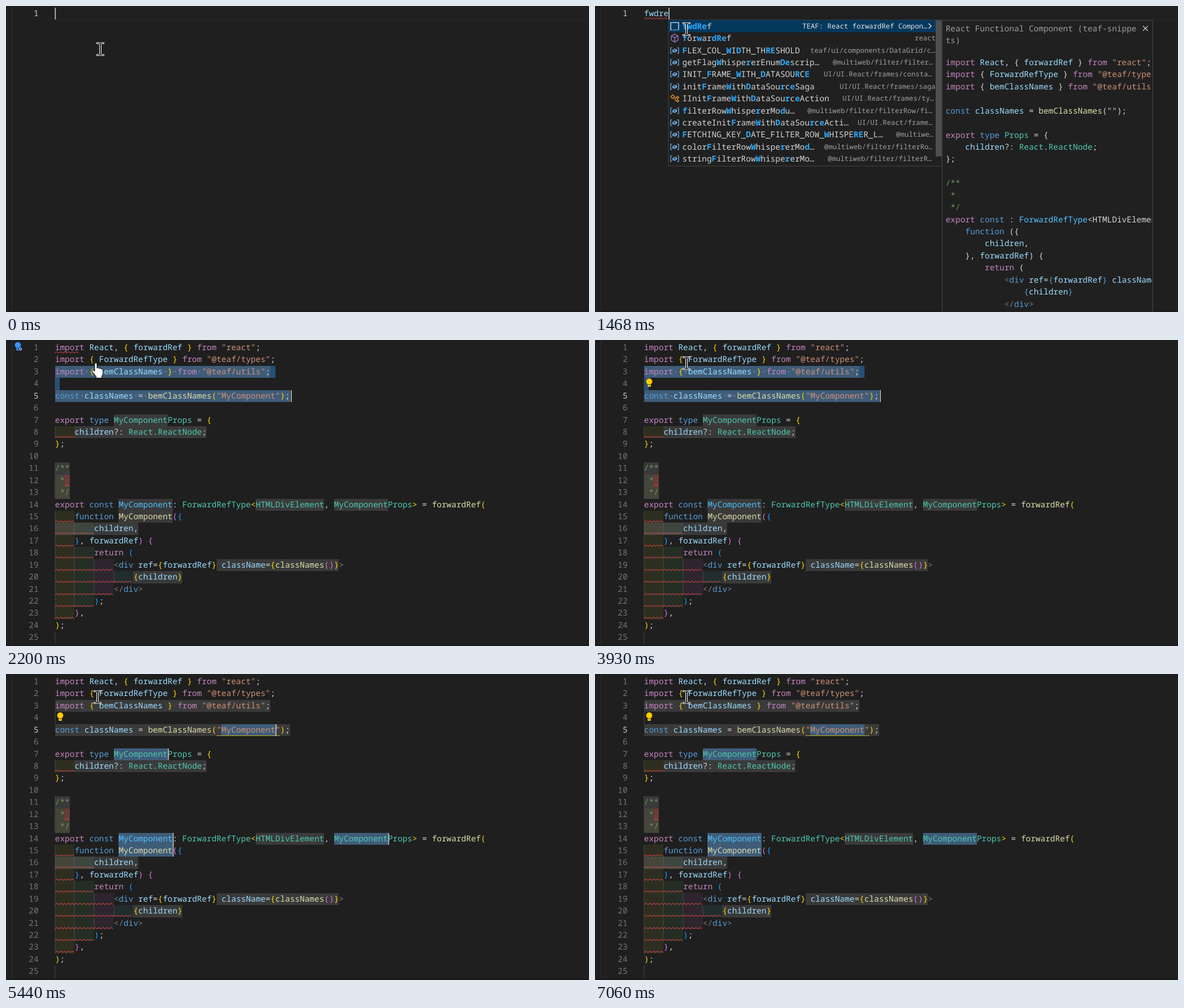
These frames come from a looping animation (1032 by 543 pixels, 8 s). An HTML page:

```html
<!DOCTYPE html>
<html lang="en">
<head>
<meta charset="utf-8">
<title>Snippet completion in a code editor</title>
<style>
html, body { margin: 0; width: 100%; height: 100%; overflow: hidden; background: #1f1f1f; }
svg { display: block; width: 1032px; height: 543px; }
text {
  font: 500 14.44px "Noto Sans Mono", "DejaVu Sans Mono", monospace;
  text-rendering: geometricPrecision;
  white-space: pre;
  fill: #d4d4d4;
}
.small { font-size: 12.3px; fill: #a0a0a0; }
.small.on { fill: #e4e4e4; }
.num { text-anchor: end; fill: #6e7681; }
.num.on { fill: #cccccc; }
.k { fill: #c586c0 } .b { fill: #569cd6 } .v { fill: #9cdcfe } .c { fill: #4fc1ff }
.s { fill: #ce9178 } .y { fill: #4ec9b0 } .f { fill: #dcdcaa } .m { fill: #6a9955 }
.g { fill: #ffd700 } .p { fill: #da70d6 } .u { fill: #179fff } .x { fill: #808080 }
.t { fill: #d4d4d4 } .d { fill: #9d9d9d } .h { fill: #2aaaff; font-weight: 700 }
.dot { fill: #8fa3b5; }
.wave { fill: none; stroke: #f14c4c; stroke-width: 1; }

/* each layer is switched hard on the shared 8 s clock */
.layer { animation: 8s step-end infinite; }
.empty { animation-name: empty }
.popup { animation-name: popup }
.code { animation-name: code }
.pick { animation-name: pick }
.select { animation-name: select }
.bulb { animation-name: bulb }
.multi { animation-name: multi }
.blink { animation-name: blink }
.beam { animation-name: beam }
.before { animation-name: before }
@keyframes empty { 0% { opacity: 1 } 4.625%, 100% { opacity: 0 } }
@keyframes before { 0% { opacity: 1 } 27.5%, 100% { opacity: 0 } }
@keyframes popup { 0% { opacity: 0 } 4.625% { opacity: 1 } 27.5%, 100% { opacity: 0 } }
@keyframes code { 0% { opacity: 0 } 27.5%, 100% { opacity: 1 } }
@keyframes pick { 0% { opacity: 0 } 27.5% { opacity: 1 } 49.125%, 100% { opacity: 0 } }
@keyframes select { 0% { opacity: 0 } 27.5% { opacity: 1 } 68%, 100% { opacity: 0 } }
@keyframes bulb { 0% { opacity: 0 } 49.125%, 100% { opacity: 1 } }
@keyframes multi { 0% { opacity: 0 } 68%, 100% { opacity: 1 } }
@keyframes blink { 0% { opacity: 0 } 68% { opacity: 1 } 88.25%, 100% { opacity: 0 } }
@keyframes beam { 0% { opacity: 0 } 4.625% { opacity: 1 } 27.5% { opacity: 0 } 49.125%, 100% { opacity: 1 } }
</style>
</head>
<body>
<svg id="stage" viewBox="0 0 1032 543" xmlns="http://www.w3.org/2000/svg"></svg>
<script>
const CHAR = 8.665, LINE = 21.43, LEFT = 86.8, TOP = 3, BASE = 15;
const colX = c => LEFT + c * CHAR;
const rowY = n => Math.round(TOP + (n - 1) * LINE);

// A bar and a letter switch the colour class: "|kimport |vReact"
const CODE = [
  '|kimport |vReact|t, |g{ |vforwardRef |g} |kfrom |s"react"|t;',
  '|kimport |g{ |vForwardRefType |g} |kfrom |s"@teaf/types"|t;',
  '|kimport |g{ |vbemClassNames |g} |kfrom |s"@teaf/utils"|t;',
  '',
  '|bconst |vclassNames |t= |fbemClassNames|g(|s"MyComponent"|g)|t;',
  '',
  '|kexport |btype |yMyComponentProps |t= |g{',
  '    |vchildren|t?: |yReact|t.|yReactNode|t;',
  '|g}|t;',
  '',
  '|m/**',
  ' |m* ',
  ' |m*/',
  '|kexport |bconst |cMyComponent|t: |yForwardRefType|g<|yHTMLDivElement|t, |yMyComponentProps|g> |t= |fforwardRef|g(',
  '    |bfunction |fMyComponent|p(|u{',
  '        |vchildren|t,',
  '    |u}|t, |vforwardRef|p) {',
  '        |kreturn |u(',
  '            |x<|bdiv |vref|t=|g{|vforwardRef|g} |vclassName|t=|g{|fclassNames|p()|g}|x>',
  '                |g{|vchildren|g}',
  '            |x</|bdiv|x>',
  '        |u)|t;',
  '    |p}|t,',
  '|g)|t;',
  ''
];

const DOC = [
  '|kimport |vReact|t, { |vforwardRef |t} |kfrom |s"react"|t;',
  '|kimport |t{ |vForwardRefType |t} |kfrom |s"@teaf/types"|t;',
  '|kimport |t{ |vbemClassNames |t} |kfrom |s"@teaf/utils"|t;',
  '',
  '|bconst |vclassNames |t= |fbemClassNames|t("");',
  '',
  '|kexport |btype |yProps |t= {',
  '    |vchildren|t?: |yReact|t.|yReactNode|t;',
  '};',
  '',
  '|m/**',
  ' |m*',
  ' |m*/',
  '|kexport |bconst |t: |cForwardRefType|t<HTMLDivElement',
  '    |bfunction |t({',
  '        |vchildren|t,',
  '    }, |vforwardRef|t) {',
  '        |kreturn |t(',
  '            |x<|bdiv |vref|t=|b{|vforwardRef|b} |vclassName',
  '                |b{|vchildren|b}',
  '            |x</|bdiv|x>'
];

// label with matched letters, detail, detail x
const ITEMS = [
  ['|hfwdRe|tf', 'TEAF: React forwardRef Compon…', 367],
  ['|hf|tor|hw|tar|hdRe|tf', 'react', 566],
  ['|hF|tLEX_COL_|hW|tI|hD|tTH_TH|hRE|tSHOLD', 'teaf/ui/components/DataGrid/c…', 381],
  ['getFlag|hW|thispe|hr|terEnum|hDe|tscrip…', '@multiweb/filter/filter…', 421],
  ['INIT_|hF|tRAME_|hW|tITH_|hD|tATASOU|hR|tC|hE', 'UI/UI.React/frames/consta…', 405],
  ['init|hF|trame|hW|tith|hD|tataSou|hr|tc|he|tSaga', 'UI/UI.React/frames/saga', 433],
  ['IInit|hF|trame|hW|tith|hD|tataSou|hr|tc|he|tAction', 'UI/UI.React/frames/ty…', 438],
  ['|hf|tilterRow|hW|thispe|hr|terMo|hd|tu…', '@multiweb/filter/filterRow/fi…', 376],
  ['createInit|hF|trame|hW|tith|hD|tataSou|hr|tc|he|tActi…', 'UI/UI.React/frame…', 465],
  ['|hF|tETCHING_KEY_|hD|tATE_FILTER_ROW_|hW|tHISPE|hRE|tR_L…', '@multiwe…', 533],
  ['color|hF|tilterRow|hW|thispe|hr|terMo|hd|t…', '@multiweb/filter/filterRo…', 406],
  ['string|hF|tilterRow|hW|thispe|hr|terMo…', '@multiweb/filter/filterR…', 412]
];

const esc = s => s.replace(/&/g, '&amp;').replace(/</g, '&lt;');
const box = (x, y, w, h, fill, extra = '') =>
  `<rect x="${x}" y="${y}" width="${w}" height="${h}" fill="${fill}" ${extra}/>`;
const span = (n, from, to, fill) => {
  const x = Math.round(colX(from));
  return box(x, rowY(n), Math.round(colX(to)) - x, rowY(n + 1) - rowY(n), fill);
};
const spans = (list, fill) => list.map(([n, a, b]) => span(n, a, b, fill)).join('');
const layer = (name, body) => `<g class="layer ${name}">${body}</g>`;
const plain = (x, y, s, cls = '') => `<text x="${x}" y="${y}" class="${cls}">${esc(s)}</text>`;
const caret = (n, c) => box(colX(c) - 0.3, rowY(n), 1.6, 21, '#c8c8c8');
const number = (n, on) => plain(57.6, rowY(n) + BASE, String(n), 'num' + (on ? ' on' : ''));

function rich(x, y, s) {
  const indent = s.match(/^ */)[0].length;
  const parts = s.slice(indent).split('|').map((p, i) =>
    i ? `<tspan class="${p[0]}">${esc(p.slice(1))}</tspan>` : esc(p));
  return `<text x="${x + indent * CHAR}" y="${y}">${parts.join('')}</text>`;
}

function wave(n, from, to) {
  let d = `M${colX(from)} ${rowY(n) + 20.2}`;
  const count = Math.floor((to - from) * CHAR / 3.4);
  for (let i = 0; i < count; i++) d += `l3.4 ${i % 2 ? 2.4 : -2.4}`;
  return `<path class="wave" d="${d}"/>`;
}

const guide = (n, c = 0) => box(Math.round(colX(c)) - 0.5, rowY(n), 1, LINE, '#484848');
const tint = (n, from, to, color) => `<g opacity=".07">${span(n, from, to, color)}</g>`;

function indents() {
  const tints = ['#ffff40', '#7fff7f', '#ff7fff', '#4fecec'];
  let out = '';
  CODE.forEach((s, i) => {
    const depth = Math.floor(s.match(/^ */)[0].length / 4);
    for (let k = 0; k < depth; k++) {
      out += tint(i + 1, 4 * k, 4 * k + 4, tints[k]) + guide(i + 1, 4 * k);
    }
    if (depth) out += wave(i + 1, 0, 4 * depth);
  });
  return out + tint(12, 0, 3, tints[0]) + tint(13, 0, 3, tints[0]);
}

const beam = (x, y) => `<path transform="translate(${x} ${y})" fill="#1f1f1f" stroke="#fff"
  d="M-6.5-11.5h5l1.5 1 1.5-1h5v2h-4l-1 1v17l1 1h4v2h-5l-1.5-1-1.5 1h-5v-2h4l1-1v-17l-1-1h-4z"/>`;

const hand = `<path fill="#fff" stroke="#111" stroke-width="1"
  d="M157 42q2-3 4 0v8q2-2 4 .5 2.200-1.500 3.500 1 2.500-1 3 1.500v6q0 3-2 5v3.500h-10v-3l-7-8.500q-1-3 1.500-3l3 2.500z"/>`;

const lamp = (x, y, fill) => `<g transform="translate(${x} ${y})" fill="${fill}">
  <circle r="5.4"/><path d="M-3 3h6v5q0 1.500-1.500 1.500h-3q-1.500 0-1.500-1.500z"/>
  <path d="M-3 6h6" stroke="#1f1f1f" stroke-width=".8"/></g>`;

function icon(i, y) {
  const open = (color, body) =>
    `<g transform="translate(141 ${y})" fill="none" stroke="${color}" stroke-width="1.2">${body}</g>`;
  if (i === 0) return open('#fff', '<path d="M-7 6.500v-13h14v13"/><path d="M-7 6.500h14" stroke-dasharray="2 1.500"/>');
  if (i === 1) return open('#b180d7', '<path d="M0-7l6 3v7.500l-6 3.500-6-3.500v-7.500zM-6-4l6 3 6-3M0-1v8"/>');
  if (i === 6) return open('#ee9d28', '<path d="M-3.500-6.500l3.500 3.500-3.500 3.500-3.500-3.500zM-1-1h5M1-1v5h3M5-4l2.500 2.500-2 2-2.500-2.500zM5 2l2.500 2.500-2 2-2.500-2.500z"/>');
  return open('#75beff', '<path d="M-4.500-5h-2.500v10h2.500M4.500-5h2.500v10h-2.500M-3.500 0l3-2.500 4 1v2.500l-3 2-4-1zM-3.500 0l4 1 3-2.500"/>');
}

function suggest() {
  let out = box(130, 25, 484, 259, '#202020', 'stroke="#454545"') + box(130.5, 25, 473, 21.5, '#04395e');
  out += box(603, 25.5, 10.5, 241.5, '#4f4f4f');
  ITEMS.forEach(([label, detail, x], i) => {
    const y = Math.round(35.7 + i * 21.42);
    out += icon(i, y) + rich(154.6, y + 5, label) + plain(x, y + 4, detail, i ? 'small' : 'small on');
  });
  return out + '<path d="M590.5 31l4.500 4.500-4.500 4.500" fill="none" stroke="#ddd" stroke-width="1.5"/>';
}

function details() {
  let out = rich(620.7, 45, '|dReact Functional Component (teaf-snippe') + rich(620.7, 66, '|dts)');
  out += '<path d="M970 35.500l8.500 8.500m0-8.500l-8.500 8.500" stroke="#ccc" stroke-width="1.3"/>';
  DOC.forEach((s, i) => out += rich(620.7, Math.round(105 + i * LINE), s));
  return box(614.5, 25.5, 373, 530, '#202020', 'stroke="#454545"') + `<g clip-path="url(#pane)">${out}</g>`;
}

const names = [[7, 12, 23], [14, 13, 24], [14, 57, 68], [15, 13, 24]];
const stops = [...names, [3, 0, 44], [5, 0, 48], [8, 4, 31], [11, 0, 3], [12, 0, 3], [13, 0, 3],
  [14, 41, 55], [16, 0, 17], [19, 33, 58], [20, 16, 26]];
const fields = [[5, 34, 45], ...names];
const blue = '#264f78';

function dots(n) {
  const s = CODE[n - 1].replace(/\|./g, '');
  return [...s].map((ch, c) => ch === ' ' ? plain(colX(c), rowY(n) + BASE, '·', 'dot') : '').join('');
}

const chrome = box(10, 0, 1, 543, '#2e2e2e') + box(0, 2, 10, 1, '#161616') + box(0, 541, 1032, 2, '#1b191a');

const editor = indents()
  + layer('select', spans([[3, 0, 45], [4, 0, 1], [5, 0, 48]], blue))
  + layer('multi', spans(fields, blue))
  + spans(stops, 'rgba(124,124,124,.3)')
  + span(12, 2, 3, 'rgba(150,50,50,.5)') + wave(12, 2, 3)
  + [4, 11, 12, 13, 25].map(n => guide(n)).join('')
  + CODE.map((s, i) => number(i + 1, i === 4) + rich(LEFT, rowY(i + 1) + BASE, s)).join('')
  + layer('select', dots(3) + dots(5) + caret(5, 48.2))
  + layer('multi', box(colX(33), 109, 13 * CHAR, 1, '#c9ac1c'))
  + layer('blink', fields.map(([n, , end]) => caret(n, end + 0.08)).join(''))
  + layer('pick', wave(1, 0, 5) + lamp(21, 9, '#3794ff')
    + '<circle cx="25.500" cy="16" r="3.200" fill="#75beff" stroke="#1f1f1f"/><circle cx="25.500" cy="16" r="1" fill="#1f1f1f"/>' + hand)
  + layer('bulb', lamp(96, 73.5, '#ffcc00'));

document.getElementById('stage').innerHTML =
  '<clipPath id="pane"><path d="M614 25h372v518h-372z"/></clipPath>'
  + chrome
  + layer('before', box(87, 3, 945, 1, '#2a2a2a') + box(87, 23.5, 945, 1, '#2a2a2a') + number(1, true))
  + layer('empty', caret(1, 0) + beam(167, 76.5))
  + layer('popup', rich(LEFT, rowY(1) + BASE, '|vfwdre') + wave(1, 0, 5) + caret(1, 5.05) + suggest() + details())
  + layer('code', editor)
  + layer('beam', beam(162, 41));
</script>
</body>
</html>
```
